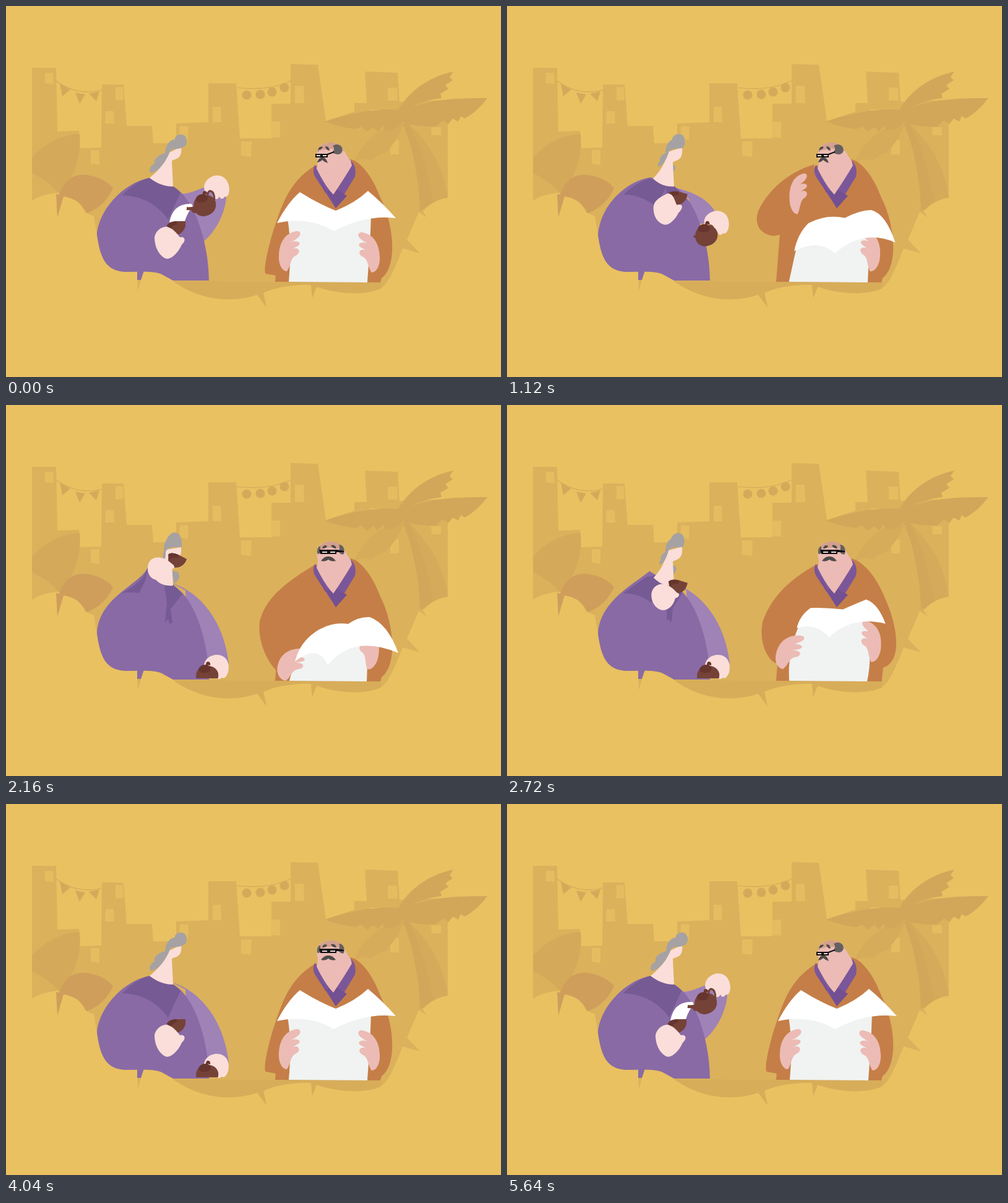
Recreate the animation shown at these times as an HTML page. Size 800x600 px, loop 5.68 s.

```html
<!DOCTYPE html>
<html>
<head>
<meta charset="utf-8">
<style>
html, body { margin: 0; width: 100%; height: 100%; overflow: hidden; background: #e9c161; }
svg { display: block; width: 800px; height: 600px; }
</style>
</head>
<body>
<svg viewBox="0 0 800 600">
  <clipPath id="aboveTable"><path d="M0 0H800V442H0Z"/></clipPath>

  <!-- city -->
  <path fill="#dbb15c" d="M42 100H81L83 203L118 202L120 230L154 229L155 127H190L195 194H236L238 222H275V190L327 188V125H372L378 214H429V158H460V94L504 95L517 186L563 171V157H583L580 106L633 108L636 155L714 152V310C690 313 682 321 673 331L680 342L667 333C661 348 654 363 648 378L669 400L641 392C628 425 618 450 605 457C575 470 530 464 502 454L495 472L493 451C465 450 435 455 416 464L421 487L406 467C360 482 310 474 270 444C250 430 235 430 222 430L213 461L212 430C170 432 158 420 147 370L142 340L128 334C115 306 90 300 75 303Q52 307 42 315Z"/>
  <path fill="#d8ad59" d="M270 445L606 447V457C575 470 530 464 502 454L495 472L493 451C465 450 435 455 416 464L421 487L406 467C360 482 310 474 270 445Z"/>
  <path fill="#e5bc60" d="M63 108H76L77 126L63 125ZM177 131H189L190 152L177 153ZM161 170H174L175 190H160ZM137 233H151V257L137 255ZM281 194L295 195L294 217L280 214ZM334 163H347L348 188H334ZM380 219H397L396 244L380 242ZM428 187H443V213L428 212ZM467 129H481L482 157H467ZM617 132H632L633 153H617ZM587 167H604L605 184H587ZM621 217H635V240H621ZM687 196H703V209H688Z"/>
  <g fill="#d4aa5a">
    <path d="M87 126L104 135L91 146ZM112 140L128 143L119 158ZM134 142L151 138L146 154Z"/>
    <circle cx="389" cy="144" r="7.5"/><circle cx="411" cy="143" r="7.5"/>
    <circle cx="430" cy="139" r="7.5"/><circle cx="450" cy="132" r="7.5"/>
    <path fill="none" stroke="#d4aa5a" stroke-width="1.2" d="M81 121Q115 146 155 136M373 132Q425 138 460 121"/>
  </g>

  <!-- plants -->
  <path fill="#d4a95a" d="M42 246C62 222 90 208 119 207C123 250 104 285 87 304Q70 284 42 270Z"/>
  <path fill="#cf9e5b" d="M86 305C96 280 108 272 128 273Q156 276 173 294C163 318 145 330 130 335Q120 312 93 308L83 342L81 304Z"/>
  <path fill="#d6ab5a" d="M643 190C600 192 570 230 561 255Q575 243 590 250Q610 235 612 238Q632 220 643 190Z"/>
  <path fill="#d5aa5a" d="M648 188Q705 240 714 310Q692 313 674 331Z"/>
  <path fill="#d2a75a" d="M641 190Q667 250 669 332L690 316Q676 235 650 189Z"/>
  <path fill="#d2a75a" d="M634 168C655 132 690 113 723 106L717 115L722 120L710 128L715 134L702 142L704 149Q675 152 654 164C690 150 735 149 778 149Q762 171 741 182L735 178L731 187L722 182L715 191L706 185L695 195Q665 196 641 188Q630 203 612 201L609 193L601 203L594 196L583 203L574 195L565 199Q537 196 516 187C555 173 600 165 634 168Z"/>

  <g id="people"></g>
</svg>
<script>
const LOOP = 5680;
const people = document.getElementById('people');
const parts = [];

function add(parent, tag, attrs) {
  const el = document.createElementNS('http://www.w3.org/2000/svg', tag);
  for (const key in attrs) el.setAttribute(key, attrs[key]);
  return parent.appendChild(el);
}
const shape = (parent, fill, d) => add(parent, 'path', { fill, d });

// A timeline lists a pose letter and its time: "A0 B800".
function animate(el, attr, timeline, poses) {
  const keys = timeline.split(' ').map(k => [+k.slice(1), poses[k[0]]]);
  parts.push({ el, attr, keys });
  return el;
}
const morph = (fill, timeline, poses, parent = people) =>
  animate(shape(parent, fill, ''), 'd', timeline, poses);
const mover = (timeline, poses, parent = people) =>
  animate(add(parent, 'g', {}), 'transform', timeline, poses);

function mix(a, b, k) {
  const end = b.match(/-?[\d.]+/g);
  let i = 0;
  return a.replace(/-?[\d.]+/g, n => (+n + (end[i++] - n) * k).toFixed(2));
}

const PURPLE = '#896aa5', DARK = '#765a94', PALE = '#fbded9', BROWN = '#754238';
const COAT = '#c57e47', SKIN = '#ecbbb5', GREY = '#656160';
const pot = 'A0 B800 T1360 T4840 A5600 A5680';
const sip = 'A0 A840 C1400 C1700 D2160 D2440 A3100 A5680';
const read = 'A0 A160 B800 C1360 C1700 D2160 D2440 E3180 E3420 A4000 A5680';
const look = 'L0 L1500 F2100 F4700 L5480 L5680';

// Woman
morph('#9f82b6', pot, {
  A: 'M275 303C295 307 312 295 325 292L356 303C357 330 340 365 318 382L300 330Z',
  B: 'M275 303C300 302 312 270 319 248L354 250C354 295 342 340 316 380L300 330Z',
  T: 'M268 288C315 303 352 350 360 418L329 413C310 400 295 350 292 340L290 300Z'
});
const bodyEnd = '147 370C152 405 160 430 195 430C215 430 235 428 250 433L270 444L328 444C328 385 305 310 270 292Z';
shape(people, PURPLE, 'M212 428H223L218 443H212Z');
morph(PURPLE, sip, {
  A: 'M232 278C192 285 150 328 ' + bodyEnd,
  C: 'M232 276C190 283 152 317 ' + bodyEnd,
  D: 'M229 263C215 292 150 310 ' + bodyEnd
});
morph(DARK, sip, {
  A: 'M188 306Q210 283 232 278L271 292L282 302L262 345Q235 308 188 306Z',
  C: 'M188 304Q208 288 226 280L233 276L232 286L218 304Q200 302 188 304Z',
  D: 'M188 304Q212 290 222 278L229 263L225 285L215 304Q200 302 188 304Z'
});
const sleeve = 'M256 292L270 290L285 306L266 330L269 352L264 354L262 346L257 352L260 320Z';
morph(DARK, sip, {
  A: 'M258 292L270 292L281 302L271 325L262 345L262 346L262 346L260 343L256 320Z',
  C: sleeve, D: sleeve
});
const tail = 'M267 268L278 270Q284 280 272 289Z';
morph('#a6a2a3', sip, { A: 'M262 245L264 246Q265 248 262 250Z', C: tail, D: tail });
const face = 'M258 234L283 230Q284 245 278 250L268 255L270 292Q250 294 240 280Q254 262 258 234Z';
morph(PALE, sip, {
  A: 'M262 238L283 228Q285 243 276 247L268 250L270 292Q250 292 232 278Q255 260 262 238Z',
  C: face, D: face
});
const hair = 'M258 238C260 228 280 230 284 230C285 222 283 210 278 208C270 203 263 210 260 217C256 222 255 228 255 238C253 240 253 244 254 248C254 250 255 250 256 250C258 248 258 244 258 238Z';
morph('#a6a2a3', sip, {
  A: 'M264 238C266 228 280 233 284 229C294 228 294 214 288 209C278 205 272 212 273 216C265 216 258 224 257 238C250 240 238 245 240 255C233 258 230 266 234 270C245 268 255 258 264 238Z',
  C: hair, D: hair
});
morph('#fff', 'A0 M560 B800 E980 E5360 S5440 A5560 A5680', {
  A: 'M300 320Q270 318 264 350L289 348Q294 332 302 325Z',
  M: 'M289 284Q274 300 267 349L287 349Q286 310 290 290Z',
  B: 'M285 294Q274 312 272 349L283 349Q288 318 286 294Z',
  E: 'M278 349Q278 349 278 349L278 349Q278 349 278 349Z',
  S: 'M300 322Q300 322 300 322L300 322Q300 322 300 322Z'
});

const cup = mover(sip, {
  A: 'translate(275 350) rotate(0)', C: 'translate(278 255) rotate(28)', D: 'translate(278 244) rotate(28)'
});
shape(cup, BROWN, 'M-15 5Q-12 -1 0 -2L15 -2Q17 12 5 19Q-4 21 -10 15Z');
shape(cup, '#66352d', 'M-15 5Q-12 -1 0 -2L2 3Q-6 4 -10 12Z');
morph(PALE, sip, {
  A: 'M240 374C242 362 254 356 260 357C270 360 275 366 281 374C290 372 291 380 284 386C278 400 265 412 257 408C246 402 240 388 240 374Z',
  C: 'M234 272C238 262 252 258 258 250C268 246 266 262 268 270C280 266 280 274 270 284C264 296 252 303 246 298C235 295 231 284 234 272Z',
  D: 'M229 264C229 250 240 245 250 247C262 249 266 256 270 258C274 262 272 266 264 266C264 276 256 283 246 283C236 283 229 276 229 264Z'
});

const potHand = mover(pot, {
  A: 'translate(341 292) rotate(0)', B: 'translate(337 236) rotate(0)', T: 'translate(341 422) rotate(15)'
});
shape(potHand, PALE, 'M-20 6C-24 -8 -10 -18 0 -18C14 -18 20 -6 20 6C19 14 16 18 13 16C10 20 6 22 4 16C1 22 -4 22 -5 14C-8 8 -12 0 -14 10C-16 16 -20 14 -20 6Z');
const table = add(people, 'g', { 'clip-path': 'url(#aboveTable)' });
const teapot = mover(pot, {
  A: 'translate(321 320) rotate(-4)', B: 'translate(318 264) rotate(0)', T: 'translate(325 436) rotate(0)'
}, table);
const fittings = mover(pot, { A: 'scale(1)', B: 'scale(1)', T: 'scale(.5)' }, teapot);
shape(fittings, BROWN, 'M-12 1Q-20 5 -29 3L-30 8L-22 9L-20 13L-10 15Z');
add(fittings, 'path', { fill: 'none', stroke: BROWN, 'stroke-width': 3, d: 'M6 -12C5 -25 19 -22 16 -5' });
shape(teapot, BROWN, 'M-18 2C-18 -18 14 -20 18 -2C20 14 6 20 -4 20C-14 18 -18 12 -18 2Z');
shape(teapot, '#66352d', 'M-14 -8C-12 -17 2 -19 6 -11Q6 -2 -4 -3Q-12 -2 -14 -8ZM-2 -16Q-2 -21 2 -21Q6 -20 5 -15Z');

// Man
const trunk = 'M500 258C460 285 444 330 440 380L435 446L';
const trunkA = trunk + '605 447L607 440C634 420 626 350 605 310C590 270 570 250 556 248Z';
morph(COAT, read, {
  A: trunkA, B: trunkA, C: trunkA, D: trunkA,
  E: trunk + '607 447L610 393C655 400 640 365 620 310C600 270 575 255 556 248Z'
});
morph(COAT, read, {
  A: 'M500 258C455 285 445 325 430 370C420 405 416 430 420 433L437 436C450 400 470 380 475 330Z',
  B: 'M500 258C455 275 425 315 400 355C385 378 390 390 405 389L430 379C450 360 470 350 475 330Z',
  C: 'M495 255C450 265 420 290 412 312C406 335 420 355 446 361L480 358C495 340 500 320 495 290Z',
  D: 'M500 258C455 285 420 310 410 350C406 385 425 420 440 432L470 400C475 380 480 350 475 330Z',
  E: 'M500 258C455 280 445 310 420 350C408 375 408 388 420 387L442 378C450 360 470 350 475 330Z'
});
shape(people, '#7b5799', 'M499 257Q494 268 500 277L533 327L564 276Q568 256 553 247L528 296Z');
shape(people, '#735092', 'M501 270L516 302L528 293L551 307L533 327Z');
shape(people, SKIN, 'M504 252C500 235 504 221 525 221C546 221 547 240 557 250L559 258Q546 280 529 305Q516 292 502 263Z');
shape(people, '#d2a08e', 'M504 235C507 216 543 216 546 235Q525 227 504 235Z');
morph(GREY, look, {
  L: 'M528 226C538 220 546 228 543 236C540 242 532 240 527 237C531 232 531 230 528 226Z',
  F: 'M538 226C546 226 548 234 546 241C542 243 540 240 538 238C539 232 540 230 538 226Z'
});
morph(GREY, look, {
  L: 'M505 233Q504 235 504 236Q504 236 505 236Z',
  F: 'M508 228Q502 230 503 240Q506 243 508 238Z'
});
morph('#4d4a49', look, {
  L: 'M504 233Q506 226 512 228Q511 232 504 233ZM516 227Q522 226 523 234Q517 233 516 227Z',
  F: 'M511 232Q513 225 519 228Q518 232 511 232ZM525 227Q532 225 534 232Q527 232 525 227Z'
});
morph('#4d4a49', look, {
  L: 'M503 253Q506 244 511 245Q517 244 520 254Q514 252 511 249Q508 252 503 253Z',
  F: 'M509 252Q515 244 521 245Q527 244 533 252Q526 254 521 250Q516 254 509 252Z'
});
morph('#111', look, {
  L: 'M500 239L519 239L530 235L530 237L520 241L520 245L500 245Z',
  F: 'M506 234L535 234L546 236L546 238L534 238L534 241L508 241Z'
});
morph('#e8d5d0', look, {
  L: 'M502 241L508 241L508 243L502 243ZM512 241L518 241L518 243L512 243Z',
  F: 'M511 237L519 237L519 239L511 239ZM524 237L532 237L532 239L524 239Z'
});

const lowPaper = 'M480 395Q500 372 525 365Q555 365 584 365C584 400 584 430 583 447L458 446C462 430 468 412 480 395Z';
morph('#f0f3f1', read, {
  A: 'M455 344Q490 330 530 350Q565 335 590 335C589 380 586 420 584 447L457 446C460 410 461 380 455 344Z',
  B: 'M462 335Q490 350 530 345Q565 330 590 325C587 370 585 410 583 447L452 446C460 410 461 380 462 335Z',
  C: lowPaper, D: lowPaper,
  E: 'M471 247Q486 280 522 281Q552 278 565 255C592 305 603 370 580 447L452 446C438 390 440 310 471 247Z'
});

const palm = 'M-19 12C-18 -12 -6 -26 12 -27C20 -24 14 -15 0 -9C8 -13 20 -9 12 -3L3 2C14 -2 18 8 8 13C0 16 0 30 -6 38C-14 38 -20 26 -19 12Z';
shape(mover(read, {
  A: 'translate(460 391) rotate(0) scale(1 1)', B: 'translate(442 347) rotate(0) scale(1 1)',
  C: 'translate(492 267) rotate(-6) scale(.8 1)', D: 'translate(464 415) rotate(8) scale(1.25 .85)',
  E: 'translate(448 352) rotate(14) scale(1 1)'
}), SKIN, palm);
const right = 'translate(585 393) rotate(0) scale(-1 1)';
const tucked = 'translate(586 389) rotate(12) scale(-1 1)';
shape(mover(read, {
  A: right, B: right, C: tucked, D: tucked, E: 'translate(589 352) rotate(-4) scale(-1 1)'
}), SKIN, palm);

const lowFold = 'M467 415Q474 385 500 367Q525 350 553 354Q570 342 588 343';
morph('#fff', read, {
  A: 'M438 351Q455 318 475 301Q505 320 533 331Q565 318 585 299Q608 318 630 343Q580 337 530 364Q490 340 438 351Z',
  B: 'M460 367Q462 345 467 327Q500 315 535 325Q570 312 590 310Q608 315 622 352Q600 344 545 368Q505 362 460 367Z',
  C: lowFold + 'Q615 350 631 402Q560 370 520 421Q505 385 467 415Z',
  D: lowFold + 'Q617 354 634 401Q560 370 520 421Q505 385 467 415Z',
  E: 'M471 247Q471 247 471 247Q486 280 522 281Q552 278 565 255Q565 255 565 255Q552 278 522 281Q486 280 471 247Z'
});

function draw(now) {
  const t = now % LOOP;
  for (const { el, attr, keys } of parts) {
    const i = keys.findIndex(k => k[0] > t);
    const [from, a] = keys[i - 1], [to, b] = keys[i];
    const u = (t - from) / (to - from);
    el.setAttribute(attr, mix(a, b, u * u * (3 - 2 * u)));
  }
}

const start = performance.now();
function frame() {
  draw(performance.now() - start);
  requestAnimationFrame(frame);
}
frame();
</script>
</body>
</html>
```
